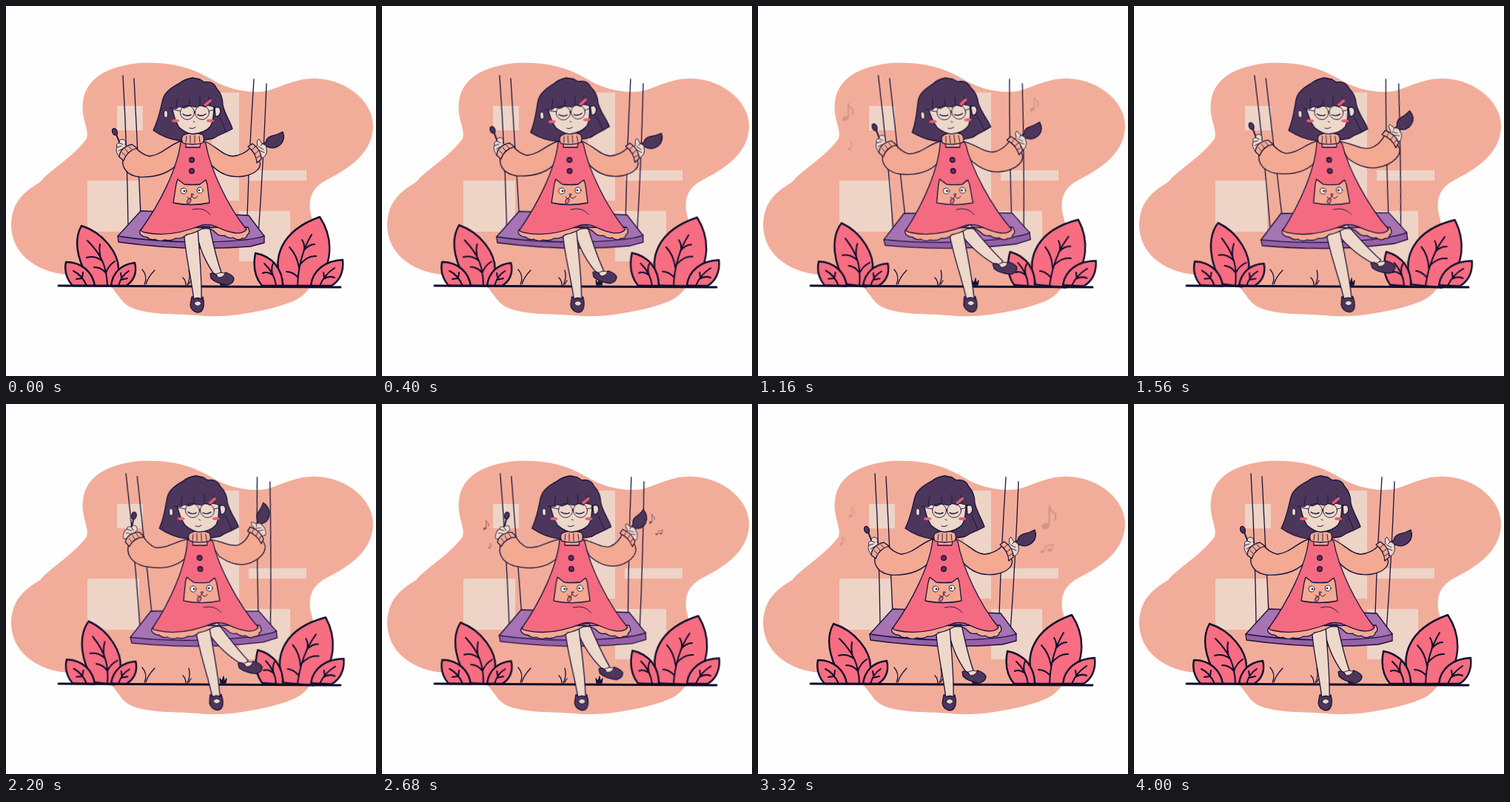
An HTML page that plays this animation: 500 by 500 pixels, repeating every 4.04 s.

```html
<!DOCTYPE html>
<html lang="en">
<head>
<meta charset="utf-8">
<title>Girl on a swing</title>
<style>
  html, body { margin: 0; width: 100%; height: 100%; overflow: hidden; background: #fefefe; }
  svg { display: block; width: 100vw; height: 100vh; }

  :root { --loop: 4040ms; --ink: #17123a; --plum: #4c365b; --peach: #f3a992; --pink: #f46b81; --skin: #eed8ca; }

  .line { fill: none; }
  .ink { stroke: var(--ink); stroke-width: 1.3; stroke-linecap: round; stroke-linejoin: round; }
  .thin { stroke-width: .9; }
  .peach { fill: var(--peach); }
  .pink { fill: var(--pink); }
  .skin { fill: var(--skin); }
  .plum { fill: var(--plum); }
  .bare { stroke: none; }
  .plant { fill: #f76d82; stroke: #0d0e2b; stroke-width: 2.4; stroke-linecap: round; stroke-linejoin: round; }
  .plant .line { stroke-width: 2; }

  .swing, .sway, .arm, .wrist, .head {
    animation: var(--loop) cubic-bezier(.37, 0, .63, 1) infinite;
  }
  .swing { animation-name: swing; transform-origin: 0 0; }
  .sway { animation-name: sway; }
  .head { animation-name: head; transform-origin: 252px 172px; }
  .left.arm { animation-name: left-arm; transform-origin: 236px 190px; }
  .left.wrist { animation-name: left-wrist; transform-origin: 161px 194px; }
  .right.arm { animation-name: right-arm; transform-origin: 268px 190px; }
  .right.wrist { animation-name: right-wrist; transform-origin: 341px 194px; }

  /* everything on the ropes leans with its depth */
  @keyframes swing {
    0%, 81.7%, 100% { transform: translateX(0) skewX(0deg); }
    34.7%, 44.6% { transform: translateX(-1.5px) skewX(3.9deg); }
  }
  @keyframes sway {
    0%, 81.7%, 100% { transform: rotate(0deg); }
    34.7%, 44.6% { transform: rotate(var(--a)); }
  }
  @keyframes head {
    0%, 38.6%, 100% { transform: rotate(0deg); }
    18.8% { transform: rotate(-6deg); }
  }
  @keyframes left-arm {
    0%, 81.7%, 100% { transform: rotate(0deg); }
    18.8% { transform: rotate(3deg); }
    38.6% { transform: rotate(5deg); }
    54.5%, 66.3% { transform: rotate(12deg); }
  }
  @keyframes left-wrist {
    0%, 38.6%, 81.7%, 100% { transform: rotate(0deg); }
    54.5%, 66.3% { transform: rotate(26deg); }
  }
  @keyframes right-arm {
    0%, 81.7%, 100% { transform: rotate(0deg) scaleX(1); }
    18.8% { transform: rotate(-1deg) scaleX(1); }
    38.6% { transform: rotate(-16deg) scaleX(1); }
    54.5% { transform: rotate(-20deg) scaleX(.9); }
    66.3% { transform: rotate(-17deg) scaleX(.88); }
  }
  @keyframes right-wrist {
    0%, 38.6%, 81.7%, 100% { transform: rotate(0deg); }
    18.8% { transform: rotate(9deg); }
    54.5% { transform: rotate(-16deg); }
    66.3% { transform: rotate(-2deg); }
  }

  .note { opacity: 0; fill: #4a3a50; stroke: #4a3a50; animation: var(--loop) linear infinite; }
  .first { animation-name: first-notes; }
  .second { animation-name: second-notes; }
  @keyframes first-notes {
    0%, 10% { opacity: 0; transform: var(--from); }
    16% { opacity: .75; }
    20% { opacity: .75; }
    32%, 100% { opacity: 0; transform: var(--to); }
  }
  @keyframes second-notes {
    0%, 60% { opacity: 0; transform: var(--from); }
    65% { opacity: .75; }
    70% { opacity: .7; }
    87%, 100% { opacity: 0; transform: var(--to); }
  }
</style>
</head>
<body>
<svg viewBox="0 0 500 500">
  <defs>
    <g id="note">
      <ellipse cx="-2" cy="7" rx="3" ry="2.2" transform="rotate(-20 -2 7)" stroke="none"/>
      <path class="line" d="M.6 6.5V-8Q1 -4 5 -2Q6 1 4 3" stroke-width="1.2"/>
    </g>
    <g id="pair">
      <ellipse cx="-6" cy="4" rx="3" ry="2.2" stroke="none"/>
      <ellipse cx="4" cy="2" rx="3" ry="2.2" stroke="none"/>
      <path class="line" d="M-3.5 4L-1 -4L9 -6L6.5 2" stroke-width="1.3"/>
    </g>
  </defs>

  <!-- backdrop -->
  <path fill="#f2ad9a" d="M104 145C100 105 126 83 180 77C218 75 247 81 274 97C298 112 327 119 352 115C377 107 394 97 419 98C464 100 498 132 496 165C494 199 464 219 437 233C416 243 409 256 411 276C414 295 427 325 421 355C418 375 405 391 390 398C370 407 345 412 320 416C298 420 275 420 258 418C225 416 192 417 170 408C152 400 149 380 132 372C113 362 81 366 57 358C26 347 7 325 7 295C8 265 24 251 46 238C60 221 92 203 109 179C112 170 106 160 104 145Z"/>
  <path fill="#edd4c7" d="M150 135h35v33h-35zM110 236h70v69h-70zM278 117h37v146h-37zM328 222h78v14h-78zM315 277h69v68h-69z"/>

  <g class="line ink" stroke-width="1">
    <path d="M187 376Q192 365 184 356M189 376Q192 366 201 357M245 377Q250 367 247 357M243 377Q243 371 239 367M247 376L250 371"/>
    <path fill="#17123a" d="M290 377L289 371L292 375L294 368L295 375L298 371L297 377Z"/>
  </g>

  <!-- plants -->
  <g class="plant">
    <g class="sway" style="--a:8deg; transform-origin:136px 378px">
      <path d="M119 378C99 353 89 320 102 297C131 306 153 334 152 357Q151 370 146 378Z"/>
      <path class="line" d="M137 378C136 353 130 337 110 317M128 343Q119 337 109 340M129 344Q125 332 127 322M135 361Q138 351 147 345M135 361Q129 353 119 353"/>
    </g>
    <g class="sway" style="--a:2deg; transform-origin:105px 378px">
      <path d="M90 378C81 368 79 356 81 346C103 346 117 360 120 378Z"/>
      <path class="line" d="M109 378Q103 364 91 358M103 368L95 369M103 367L104 360"/>
    </g>
    <g class="sway" style="--a:3deg; transform-origin:155px 378px">
      <path d="M142 378C144 360 156 349 174 347C178 362 171 373 162 378Z"/>
      <path class="line" d="M152 378Q156 364 166 358M156 367L155 361M155 370L164 368"/>
    </g>

    <g class="sway" style="--a:6deg; transform-origin:390px 378px">
      <path d="M375 378C357 342 371 304 424 285C445 317 440 354 416 378Z"/>
      <path class="line" d="M394 378C395 348 402 327 413 309M396 354Q393 336 383 326M397 350Q407 337 419 338M403 329Q404 322 400 316M402 331Q409 322 417 322M394 366Q387 359 379 359"/>
    </g>
    <g class="sway" style="--a:5deg; transform-origin:360px 378px">
      <path d="M346 378C335 365 334 349 337 334C360 338 374 356 374 378Z"/>
      <path class="line" d="M365 378Q363 361 349 348M361 364Q353 358 347 361M360 362Q358 353 361 348"/>
    </g>
    <g class="sway" style="--a:3deg; transform-origin:428px 378px">
      <path d="M412 378C414 357 432 344 455 343C457 360 450 372 440 378Z"/>
      <path class="line" d="M424 378Q430 363 444 354M430 367L429 360M429 369Q436 364 444 367"/>
    </g>
    <path class="line" d="M71 378Q250 379 452 380" style="stroke-width:2.8"/>
  </g>

  <!-- swing and girl -->
  <g class="swing">
    <path class="line ink" d="M158 94Q164 200 165 298M173 98Q178 200 182 280M335 99Q329 190 326 284M352 105Q348 210 341 308"/>

    <g class="sway ink" style="--a:-2.8deg; transform-origin:254px 303px">
      <path fill="#9661a6" d="M151 311L152 319Q245 332 330 325L349 320V310Z"/>
      <path fill="#a673b3" d="M151 311L182 277Q255 279 328 283L349 311Q325 319 250 319Q195 318 151 311Z"/>
    </g>

    <g class="sway ink" style="--a:-27deg; transform-origin:266px 309px">
      <path class="skin" d="M256 298L275 298C280 322 285 343 291 360L283 365C271 348 261 330 256 298Z"/>
      <g class="sway" style="--a:23deg; transform-origin:286px 362px">
        <path class="plum" d="M276 362Q280 359 285 364Q292 365 297 360Q306 363 308 368Q308 375 299 377Q284 375 277 368Z"/>
        <path class="skin thin" d="M284 362Q290 359 296 361Q294 367 287 367Z"/>
      </g>
    </g>
    <g class="sway ink" style="--a:-3deg; transform-origin:252px 308px">
      <path class="skin" d="M240 300H259C261 332 265 365 264 397L254 398C250 363 242 337 240 300Z"/>
      <path class="plum" d="M251 393Q253 392 254 396Q259 393 264 396L266 393Q268 400 267 406Q265 415 258 414Q250 412 249 404Z"/>
      <path class="skin thin" d="M254 402Q259 395 264 402Q259 409 254 402Z"/>
    </g>

    <!-- arms -->
    <g class="left arm ink">
      <g class="left wrist">
        <path class="line" d="M156 191L148 171" style="stroke-width:2"/>
        <ellipse class="plum" cx="147" cy="170" rx="3.2" ry="4.8" transform="rotate(-22 147 170)"/>
        <path class="skin thin" d="M153 204Q147 196 150 191Q148 186 153 185Q153 180 158 180Q163 182 161 187Q166 192 166 198Z"/>
        <path class="line thin" d="M150 191L156 189M152 196L157 193M153 185L158 187"/>
      </g>
      <path class="peach" d="M238 182C222 186 211 201 194 203Q183 201 174 190L158 206C156 218 163 229 180 231C202 232 222 226 235 210Z"/>
      <path class="peach" d="M153 204Q154 191 170 187L177 192Q163 196 159 209Z"/>
      <path class="line thin" d="M157 198L161 202M161 193L165 198M166 190L170 194"/>
    </g>
    <g class="right arm ink">
      <g class="right wrist">
        <path class="plum" d="M342 190L351 184Q352 178 358 176Q367 174 374 170Q378 180 371 187Q362 195 353 190L346 195Z"/>
        <path class="skin thin" d="M337 202Q335 193 340 188Q338 181 342 180L346 186Q353 188 352 193Q354 199 348 205Z"/>
        <path class="line thin" d="M341 190L348 194M342 195L349 198M346 186L344 189"/>
      </g>
      <path class="peach" d="M266 182C282 187 292 202 306 203Q320 202 330 192L342 208C347 218 338 227 321 230C302 233 285 226 272 208Z"/>
      <path class="peach" d="M327 190L333 186Q345 194 345 207L339 212Q338 198 327 190Z"/>
      <path class="line thin" d="M332 195L337 190M336 200L341 196M339 205L344 202"/>
    </g>

    <!-- dress -->
    <g class="ink">
      <path class="peach" d="M185 300Q178 304 182 309Q187 313 190 312Q195 317 201 315Q208 319 214 316Q223 318 229 314Q238 315 244 309Q255 307 265 301Q276 299 282 305Q288 312 295 310Q301 315 307 313Q314 318 319 314Q325 315 326 309Q331 307 327 299Z"/>
      <path class="pink" d="M236 184Q240 181 243 185V191H262L263 184Q267 181 270 186C276 220 299 270 325 302Q319 309 306 306C288 303 282 293 265 296C245 304 216 313 188 306Q183 305 182 303C208 267 232 219 236 184Z"/>
      <path class="line thin" d="M252 275Q268 271 276 282"/>
      <circle fill="#6b2c55" cx="251" cy="208" r="3.3"/>
      <circle fill="#6b2c55" cx="251" cy="223" r="3.3"/>
      <path class="peach" d="M230 241L232 234L241 241Q252 242 262 241L270 235L272 241L275 266Q250 271 226 266Z"/>
      <g class="thin">
        <circle fill="#fff4e8" cx="240" cy="250" r="4"/>
        <circle fill="#fff4e8" cx="262" cy="249" r="4"/>
        <path class="pink" d="M246 261Q243 266 246 267Q250 267 250 261Z"/>
        <path class="line" d="M245 258Q248 263 251 257Q255 263 259 257M251 257L250 254H253Z"/>
      </g>
      <circle cx="241" cy="250" r=".7"/><circle cx="261" cy="249" r=".7"/>
    </g>

    <!-- head -->
    <g class="head ink">
      <path class="plum" d="M199 168C207 152 209 137 212 126C215 115 226 109 235 104Q241 99 252 97L262 99L268 103Q281 101 285 112Q293 120 293 134C296 147 303 156 306 166Q297 171 287 175L280 179Q255 184 235 182Q216 180 199 168Z"/>
      <path class="peach" d="M239 175Q236 180 239 185Q252 189 266 185Q269 180 266 174Q252 168 239 175Z"/>
      <path class="line thin" d="M244 176L243 184M249 175V185M255 175V185M261 176L262 184"/>
      <path class="skin" d="M224 134Q227 153 234 164Q243 172 252 173Q268 172 276 163Q281 154 281 134Z"/>
      <path class="skin" d="M282 138Q289 134 290 142Q289 150 283 149Z"/>
      <ellipse class="skin thin" cx="216" cy="146" rx="2.5" ry="4.8"/>
      <path class="plum bare" d="M221 138V118L250 103L280 118L283 137L272 134L270 137L262 134L257 137L248 135L241 138L234 136L230 139Z"/>
      <path class="line thin" d="M221 138L230 139L234 136L241 138L248 135L257 137L262 134L270 137L272 134L283 137M248 126V134M262 123V133M232 125L230 137M274 123L276 134M289 151Q294 161 297 170"/>
      <path class="line" d="M269 134L276 128" style="stroke:#ef5b73;stroke-width:3.6"/>
      <g class="line thin">
        <circle cx="245" cy="144" r="9.5"/>
        <circle cx="265" cy="144" r="9.5"/>
        <path d="M254 143Q255 141 256 143M236 142L226 140M274 142L282 140M253 156L255 157M248 165Q252 167 256 164"/>
        <path d="M239 146Q244 150 250 147M259 147Q265 150 270 146" stroke-width="1.4"/>
      </g>
      <g class="bare" fill="#f05d72">
        <ellipse cx="229" cy="155" rx="5" ry="2"/>
        <ellipse cx="276" cy="155" rx="5" ry="2"/>
      </g>
    </g>
  </g>

  <!-- music -->
  <g class="note first" style="--from:translate(145px,172px) scale(.9); --to:translate(117px,137px) scale(1.5)"><use href="#note"/></g>
  <g class="note first" style="--from:translate(142px,186px) scale(.4); --to:translate(122px,189px) scale(.7)"><use href="#note"/></g>
  <g class="note first" style="--from:translate(360px,160px) scale(.7); --to:translate(375px,127px) scale(1.2)"><use href="#note"/></g>
  <g class="note second" style="--from:translate(146px,170px) scale(.7); --to:translate(122px,141px) scale(.8)"><use href="#note"/></g>
  <g class="note second" style="--from:translate(159px,194px) scale(.3); --to:translate(104px,182px) scale(.8)"><use href="#note"/></g>
  <g class="note second" style="--from:translate(353px,156px) scale(.3); --to:translate(401px,151px) scale(2.2)"><use href="#note"/></g>
  <g class="note second" style="--from:translate(368px,165px) scale(.4); --to:translate(395px,202px) scale(1.1)"><use href="#pair"/></g>
</svg>
</body>
</html>
```
